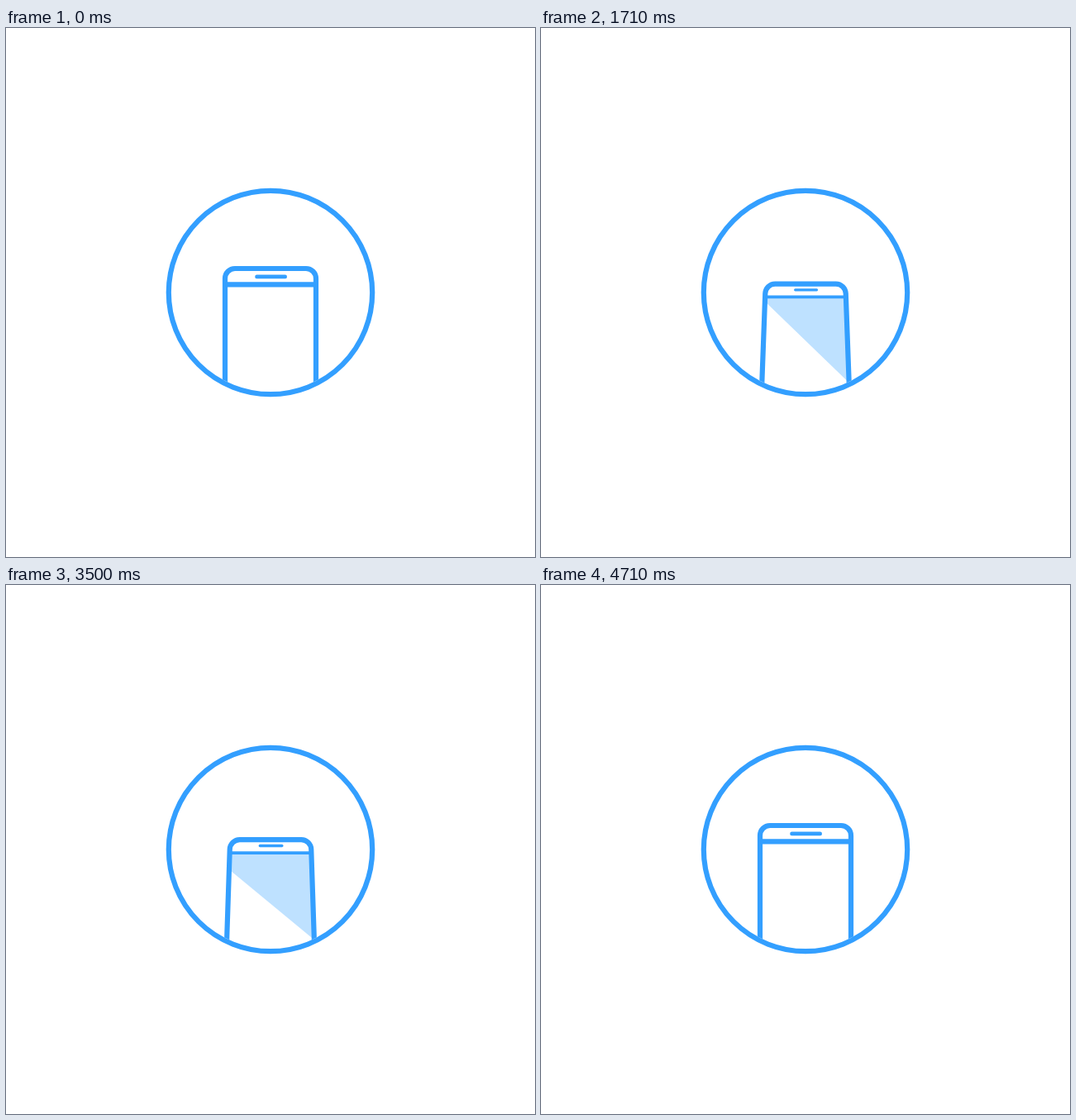
An HTML page with a canvas for the animation above (4.78 s loop, 640 by 640 pixels).

```html
<!DOCTYPE html>
<html lang="en">
<head>
<meta charset="utf-8">
<title>Tilting phone</title>
<style>
  html, body { margin: 0; width: 100%; height: 100%; overflow: hidden; background: #fff; }
  canvas { display: block; width: 640px; height: 640px; }
</style>
</head>
<body>
<canvas id="stage" width="640" height="640"></canvas>
<script>
const ctx = document.getElementById('stage').getContext('2d');
const BLUE = '#339fff', LIGHT = '#bee1ff';
const LOOP = 4780, HALF = LOOP / 2, FPS = 14;

const mix = (a, b, t) => a + (b - a) * t;

// Cubic ease with flat ends; x1 and x2 are the horizontal handles.
function ease(x1, x2) {
  return x => {
    let lo = 0, hi = 1;
    for (let i = 0; i < 30; i++) {
      const s = (lo + hi) / 2, r = 1 - s;
      if (3 * s * r * r * x1 + 3 * s * s * r * x2 + s * s * s < x) lo = s;
      else hi = s;
    }
    return lo * lo * (3 - 2 * lo);
  };
}

const tiltEase = ease(0.85, 0.38);
const shineIn = ease(0.812, 0.576);
const shineOut = ease(0.95, 0.25);

function line(x1, y1, x2, y2, width, cap) {
  ctx.lineWidth = width;
  ctx.lineCap = cap;
  ctx.beginPath();
  ctx.moveTo(x1, y1);
  ctx.lineTo(x2, y2);
  ctx.stroke();
}

function bodyPath(tilt) {
  const top = mix(291, 312.5, tilt);
  const foot = mix(55, 52.8, tilt), head = mix(55, 47.3, tilt);
  const path = new Path2D();
  path.moveTo(320 - foot, 440);
  path.arcTo(320 - head, top, 320, top, 12);
  path.arcTo(320 + head, top, 320 + foot, 440, 12);
  path.lineTo(320 + foot, 440);
  return path;
}

function drawShine(body, barY, shine) {
  if (shine < 1e-4) return;
  const left = 372 - 151 * shine;
  const low = Math.min(428.5, barY + 2 + 203 * Math.sqrt(shine));
  ctx.save();
  ctx.clip(body);
  ctx.fillStyle = LIGHT;
  ctx.beginPath();
  ctx.moveTo(left, barY + 1);
  ctx.lineTo(377, barY + 1);
  ctx.lineTo(377, low);
  ctx.lineTo(372, low);
  ctx.fill();
  ctx.restore();
}

function drawPhone(tilt, shine) {
  const body = bodyPath(tilt);
  const barY = mix(310.3, 327.7, tilt);
  const barHalf = mix(55, 47, tilt);
  const slotY = mix(300.9, 319.2, tilt);
  const slotW = mix(4.6, 3.1, tilt);
  const slotHalf = mix(19.4, 13.8, tilt) - slotW / 2;

  ctx.save();
  ctx.beginPath();
  ctx.arc(320, 320, 120.2, 0, Math.PI * 2);
  ctx.clip();
  drawShine(body, barY, shine);
  ctx.strokeStyle = BLUE;
  line(320 - barHalf, barY, 320 + barHalf, barY, mix(6.2, 3.2, tilt), 'butt');
  line(320.6 - slotHalf, slotY, 320.6 + slotHalf, slotY, slotW, 'round');
  ctx.lineWidth = 6.2;
  ctx.stroke(body);
  ctx.restore();
}

function drawRing() {
  ctx.strokeStyle = BLUE;
  ctx.lineWidth = 6.2;
  ctx.beginPath();
  ctx.arc(320, 320, 123.2, 0, Math.PI * 2);
  ctx.stroke();
}

function render(now) {
  const ms = now % LOOP;
  // The motion advances in fixed steps.
  const t = Math.floor(ms * FPS / 1000 + 0.08) * 1000 / FPS;
  const back = t > HALF;
  const u = Math.min(1, (back ? t - HALF : t) / HALF);
  const tilt = back ? 1 - tiltEase(u) : tiltEase(u);
  const shine = back ? 1 - shineOut(u) : shineIn(u);

  ctx.fillStyle = '#fff';
  ctx.fillRect(0, 0, 640, 640);
  drawPhone(tilt, shine);
  drawRing();
}

const start = performance.now();
function tick() {
  render(performance.now() - start);
  requestAnimationFrame(tick);
}
tick();
</script>
</body>
</html>
```
